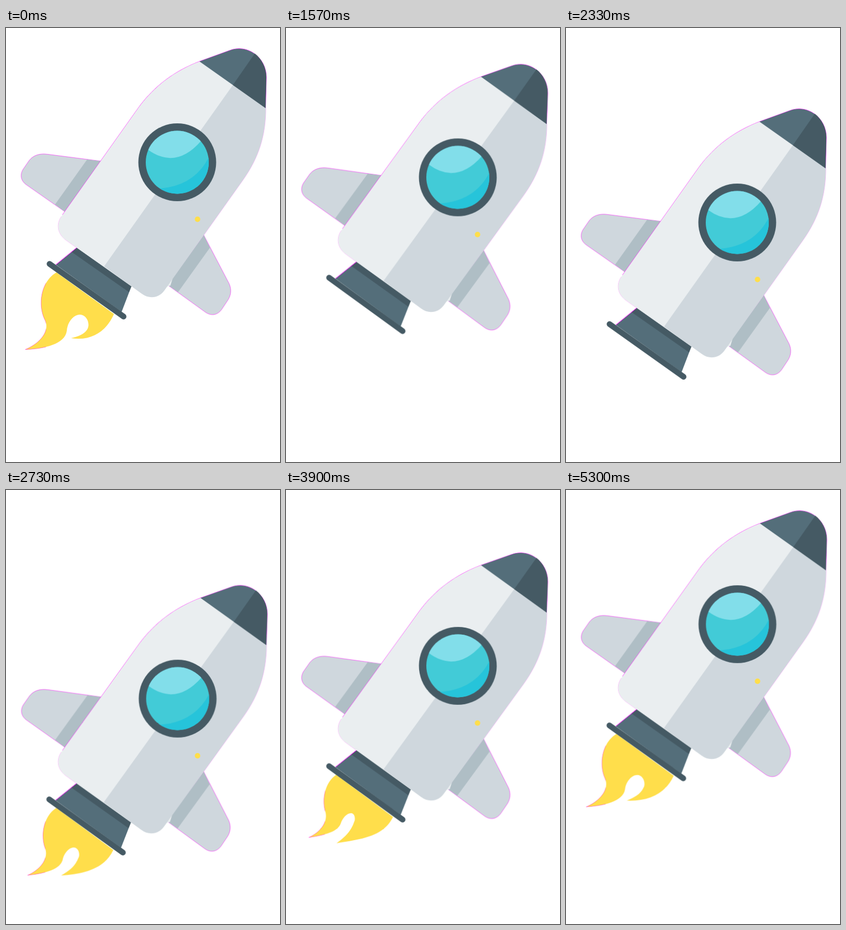
These frames come from a looping animation (500 by 792 pixels, 5330 ms). An HTML page:

```html
<!DOCTYPE html>
<html lang="en">
<head>
<meta charset="utf-8">
<title>Rocket</title>
<style>
  html, body { margin: 0; width: 100%; height: 100%; overflow: hidden; background: #fff; }
  svg { position: absolute; left: 0; top: 0; width: 500px; height: 792px; }

  :root { --loop: 5330ms; --shake: calc(var(--loop) / 32); }

  .ship { animation: drift var(--loop) linear infinite; }
  .tilt { transform-origin: 349px 349px; animation: tilt var(--shake) linear infinite alternate; }
  .burn { animation: burn var(--loop) step-end infinite; }
  .flame { fill: #ffde4b; animation: flicker var(--shake) linear infinite alternate; }

  .light { fill: #eaeef0; }
  .shade { fill: #cfd7dd; }
  .band { fill: #afbec5; }
  .steel { fill: #546e7a; }
  .dark { fill: #455a64; }
  .fringe { fill: none; stroke: #f0f; stroke-width: 1; }
  .faint { stroke-opacity: .35; }
  .fin { stroke: #f0f; stroke-width: .9; stroke-opacity: .6; }

  /* Idle bob, fall with the engine off, hover, climb back */
  @keyframes drift {
    0% { transform: translateY(0); }
    3.125% { transform: translateY(6px); }
    6.25% { transform: translateY(13px); }
    9.375% { transform: translateY(16.5px); }
    11.875% { transform: translateY(16px); }
    13.125% { transform: translateY(14px); }
    15.625% { transform: translateY(4px); }
    17.5% { transform: translateY(0); }
    20.625% { transform: translateY(5px); }
    25% { transform: translateY(14.5px); }
    29.375% { transform: translateY(27.5px); }
    30.625% { transform: translateY(32.5px); }
    33.125% { transform: translateY(46px); }
    37.5% { transform: translateY(74px); }
    41.25% { transform: translateY(97px); }
    43.75% { transform: translateY(110px); }
    46.875% { transform: translateY(125px); }
    50% { transform: translateY(135px); }
    53.75% { transform: translateY(138px); }
    56.25% { transform: translateY(137px); }
    58.75% { transform: translateY(135px); }
    60.625% { transform: translateY(131.3px); }
    62.5% { transform: translateY(124px); }
    71.875% { transform: translateY(83px); }
    75% { transform: translateY(67px); }
    82.5% { transform: translateY(29.5px); }
    85% { transform: translateY(20.5px); }
    87.5% { transform: translateY(13px); }
    92.5% { transform: translateY(1.5px); }
    95%, 100% { transform: translateY(0); }
  }
  @keyframes tilt {
    from { transform: rotate(0deg); }
    to { transform: rotate(1deg); }
  }
  @keyframes burn {
    0% { visibility: visible; }
    18.75% { visibility: hidden; }
    46.875%, 100% { visibility: visible; }
  }
  @keyframes flicker {
    from { d: path("M92 446C64 462 57 505 71 533C81 553 62 576 35 587C70 586 108 577 111 553C112 537 123 523 135 523C148 523 155 541 148 551C143 559 132 563 119 566C158 572 184 552 197 522Z"); }
    to { d: path("M93 446C74 462 74.5 489 76 502C76 519 66 533.5 50 542C67.5 536 88 532 95 522C99.5 516 105.5 510.5 110 510.5C112 510.5 110 516 110.5 517C105.5 539 96 555.5 76.5 574.5C120.5 557 176.5 564.5 197 522Z"); }
  }
</style>
</head>
<body>
<svg viewBox="0 0 500 792">
  <defs>
    <clipPath id="glass"><circle cx="312.5" cy="245" r="57.5"/></clipPath>
    <clipPath id="left"><path d="M0 440H73V600H0Z"/></clipPath>
  </defs>
  <g class="ship"><g class="tilt">
    <g class="burn">
      <path class="flame" d="M92 446C64 462 57 505 71 533C81 553 62 576 35 587C70 586 108 577 111 553C112 537 123 523 135 523C148 523 155 541 148 551C143 559 132 563 119 566C158 572 184 552 197 522Z"/>
      <g clip-path="url(#left)">
        <path class="flame" style="stroke:#f0f;stroke-width:.7;stroke-opacity:.6" d="M92 446C64 462 57 505 71 533C81 553 62 576 35 587C70 586 108 577 111 553C112 537 123 523 135 523C148 523 155 541 148 551C143 559 132 563 119 566C158 572 184 552 197 522Z"/>
      </g>
    </g>

    <!-- nozzle -->
    <path class="steel" d="M129 401L229 471L211 518L91 432Z"/>
    <path class="dark" d="M129 401L229 471L224.5 482L119.5 408.5Z"/>
    <path class="fringe" d="M129 401L91 432"/>
    <path d="M79.5 430.5L214.5 526.5" stroke="#455a64" stroke-width="10.5" stroke-linecap="round"/>

    <!-- fins -->
    <path class="shade fin" d="M174 243L77 230.5C60 228 49 233 42 242L31 258C25 268 27 279 37 286L107 335Z"/>
    <path class="band" d="M148 240L174 243L107 335L89.5 322Z"/>
    <path class="shade fin" d="M361 378L407 466C412 477 411 488 404 498L396 510C388 524 375 527 363 518L295 469Z"/>
    <path class="band" d="M361 378L372 401L314 482L295 469Z"/>

    <!-- body -->
    <path class="fringe faint" d="M474 146C474 197 461 237 432 278L361 378M101 344C92 357 93 374 108 386L129 401"/>
    <path class="fringe" d="M103 341L242 145C271 105 309 78 353 61L408 41C440 28.5 475 53 475 90L473.5 146"/>
    <path class="light" d="M353 61C309 78 271 105 242 145L101 344C92 357 93 374 108 386L248 485L300 470L414 104Z"/>
    <path class="shade" d="M414 104L474 146C474 197 461 237 432 278L289 479C279 493 261 495 248 485L179 435Z"/>
    <path class="steel" d="M353 61L408 41C440 28.5 475 53 475 90L473.5 146Z"/>
    <path class="dark" d="M414 104L454 46.5C466 56 475 71.5 475 90L473.5 146Z"/>

    <!-- window -->
    <circle class="dark" cx="312.5" cy="245" r="71"/>
    <g clip-path="url(#glass)">
      <path fill="#42cbd7" d="M250 180H375V310H250Z"/>
      <path fill="#82deea" d="M259 222Q310 259 356 206V180H250Z"/>
      <path fill="#26c4da" d="M280 293Q345 288 371 234V310H280Z"/>
    </g>
    <circle cx="349.5" cy="349" r="5" fill="#ffde4b"/>
  </g></g>
</svg>
</body>
</html>
```
